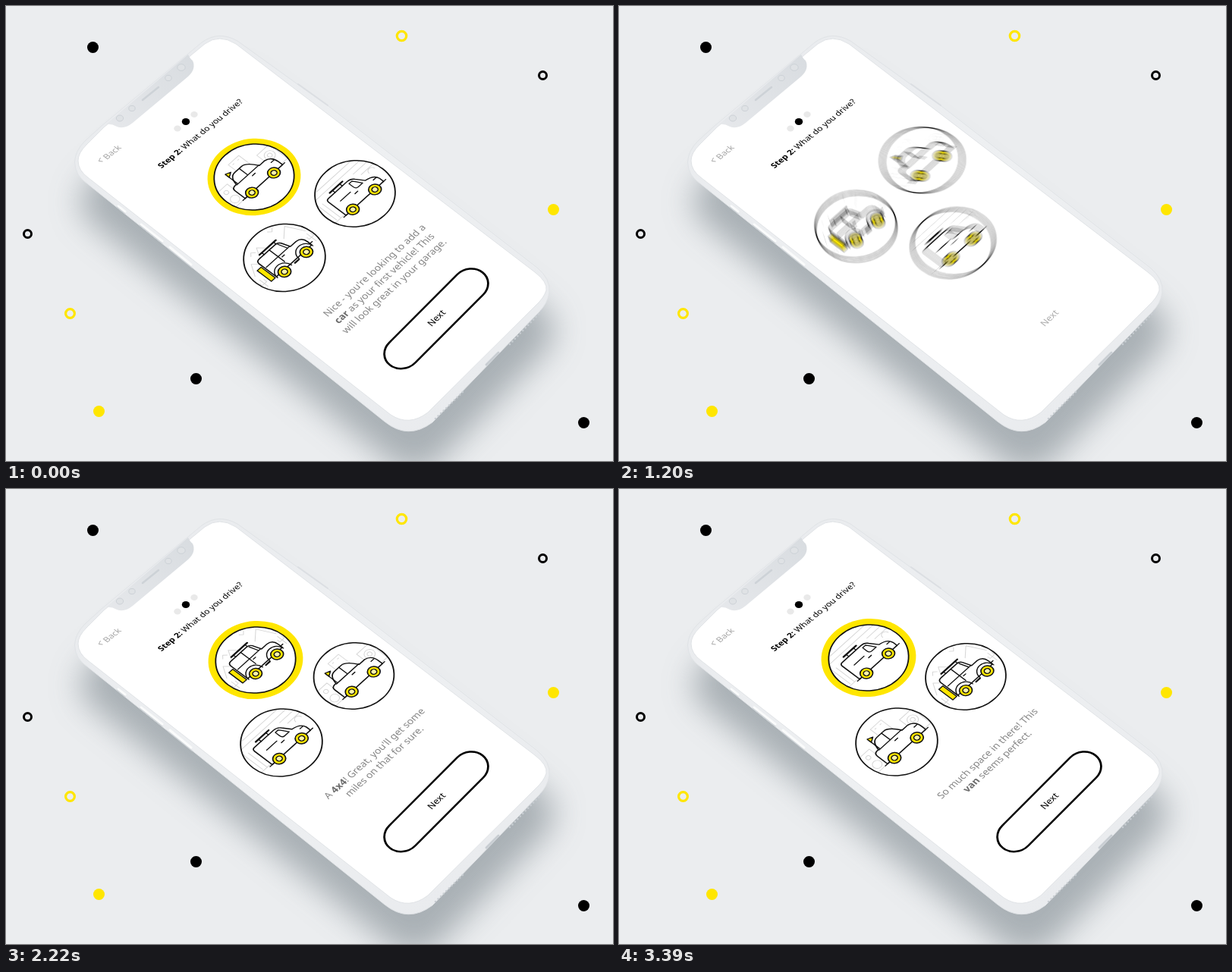
Animation of 800x600 px, one loop 3420 ms. Source, as an HTML page with a canvas:

```html
<!DOCTYPE html>
<html lang="en">
<head>
<meta charset="utf-8">
<title>What do you drive?</title>
<style>
  html, body { margin: 0; width: 100%; height: 100%; overflow: hidden; background: #ebedef; }
  svg, canvas { position: absolute; left: 0; top: 0; width: 800px; height: 600px; }
  text { font-family: "Noto Sans", "Open Sans", sans-serif; }
  .msg text { font-size: 12.9px; fill: #858585; text-anchor: middle; }
  .msg tspan { font-weight: 700; fill: #6c6c6c; }
  .msg { opacity: 0; }
</style>
</head>
<body>
<svg viewBox="0 0 800 600">
  <defs>
    <filter id="soft" x="-25%" y="-25%" width="150%" height="150%"><feGaussianBlur stdDeviation="21"/></filter>
    <linearGradient id="rim" x1="0" y1="0" x2="1" y2="1">
      <stop offset="0" stop-color="#e8eaed"/><stop offset=".5" stop-color="#eef0f2"/><stop offset="1" stop-color="#e8eaed"/>
    </linearGradient>
    <linearGradient id="notch" x1="0" y1="1" x2="1" y2="0">
      <stop offset="0" stop-color="#e6e8eb"/><stop offset="1" stop-color="#d8dce0"/>
    </linearGradient>
    <path id="body" d="M90.500 206Q91 191 104 178L126 158L258 48Q280 32 305 46L384 103L425 132L700 345Q718 360 716 378Q714 392 702 404L562 549Q530 573 499 548L108 235Q91 224 90.500 206Z"/>
  </defs>

  <use href="#body" transform="translate(7 53)" fill="#8d969c" opacity=".7" filter="url(#soft)"/>
  <use href="#body" fill="url(#rim)" stroke="#e0e3e6" stroke-width="1"/>
  <path d="M385 103L424 131" stroke="#dcdfe3" stroke-width="2" stroke-linecap="round"/>
  <g fill="none" stroke="#fafbfb" stroke-width="3" stroke-linecap="round">
    <path d="M148 264L157 271M178 288L206 310M216 318L244 341"/>
    <path stroke="#cfd4d8" stroke-width="1.2" d="M146 265L157 274M176 289L206 313M214 320L245 345"/>
  </g>
  <g fill="none" stroke="#c8cdd2" stroke-linecap="round">
    <path stroke-width="2.600" stroke-dasharray="0 5" d="M566 544L604 507M664 446L706 402"/>
    <path stroke-width="3" d="M633 473L649 457"/>
  </g>
  <path fill="#fff" stroke="#e0e3e6" stroke-width="1" d="M129 160L262 50Q281 36 303 50L697 351Q714 364 712 375Q709 385 698 395L556 536Q531 555 507 539L109 227Q95 217 95 204Q95 194 106 183Z"/>
  <path fill="url(#notch)" d="M132 156L240 64Q243 70 246 72Q251 83 240 93L167 154Q156 163 146 159Q139 155 132 156Z"/>
  <g fill="#dfe2e5" stroke="#cdd2d7">
    <ellipse cx="150" cy="148" rx="4.7" ry="4"/><ellipse cx="166" cy="135" rx="4.2" ry="3.6"/>
    <ellipse cx="214" cy="95" rx="4.2" ry="3.6"/><ellipse cx="231" cy="81" rx="5.2" ry="4.4"/>
    <path d="M180 124L201 107" stroke-width="2.500" stroke-linecap="round"/>
  </g>

  <path fill="none" stroke="#aaa" d="M124.500 200L122.300 204.500L127.500 205"/>
  <text transform="matrix(.78 -.63 .77 .57 133 203)" font-size="11.3" fill="#a6a6a6">Back</text>
  <ellipse cx="226" cy="161.500" rx="4.700" ry="4" fill="#e9e9e9"/>
  <ellipse cx="237" cy="152.500" rx="5.200" ry="4.500" fill="#000"/>
  <ellipse cx="248" cy="143" rx="4.700" ry="4" fill="#e9e9e9"/>
  <text transform="matrix(.775 -.632 .77 .57 259 170.500)" font-size="11.1" text-anchor="middle"><tspan font-weight="700">Step 2:</tspan> What do you drive?</text>

  <g class="msg">
    <text transform="matrix(.74 -.672 .78 .6 489 351.500)">Nice - you're looking to add a</text>
    <text transform="matrix(.74 -.672 .78 .6 502 361.800)"><tspan>car</tspan> as your first vehicle! This</text>
    <text transform="matrix(.74 -.672 .78 .6 515 372.100)">will look great in your garage.</text>
  </g>
  <g class="msg">
    <text transform="matrix(.74 -.672 .78 .6 489 351.500)">A <tspan>4x4</tspan>! Great, you'll get some</text>
    <text transform="matrix(.74 -.672 .78 .6 502 361.800)">miles on that for sure.</text>
  </g>
  <g class="msg">
    <text transform="matrix(.74 -.672 .78 .6 489 351.500)">So much space in there! This</text>
    <text transform="matrix(.74 -.672 .78 .6 502 361.800)"><tspan>van</tspan> seems perfect.</text>
  </g>

  <rect id="button" transform="matrix(.73 -.732 .78 .6 567 412.300)" x="-83.500" y="-22" width="167" height="44" rx="22" fill="none" stroke="#000" stroke-width="2.6"/>
  <text id="next" transform="matrix(.73 -.7 .78 .6 570.500 414)" font-size="12" text-anchor="middle">Next</text>

  <g fill="#000"><circle cx="114.500" cy="54.500" r="7.500"/><circle cx="250.500" cy="491.500" r="7.500"/><circle cx="761.500" cy="549.500" r="7.500"/></g>
  <g fill="#ffe600"><circle cx="721.500" cy="268.500" r="7.500"/><circle cx="122.500" cy="534.500" r="7.500"/></g>
  <g fill="none" stroke="#ffe600" stroke-width="3.200"><circle cx="521.500" cy="39.500" r="6.200"/><circle cx="84.500" cy="405.500" r="5.900"/></g>
  <g fill="none" stroke="#000" stroke-width="3"><circle cx="707.500" cy="91.500" r="5"/><circle cx="28.500" cy="300.500" r="5"/></g>
</svg>
<canvas id="stage" width="800" height="600"></canvas>

<script>
const LOOP = 3420, SPIN = 400, SHUTTER = 18, SAMPLES = 10;
const STARTS = [1004, 2282];
const YELLOW = '#ffe600', INK = '#111', RADIUS = 50.1;

// Each vehicle is drawn flat in a circle of radius 50; slots are top, right, left.
const vehicles = [
  { // car
    slots: [[327, 225.5], [458.5, 246.5], [366, 333.5]],
    scene: 'M-52-18H-30V14H-52ZM-34 5a6 6 0 1 0-12 0a6 6 0 1 0 12 0M-37-10a3 3 0 1 0-6 0a3 3 0 1 0 6 0M-8-37H11V-10H-8ZM-4-33h2M5-33h2M26-20H48V12H26ZM44-8a7 7 0 1 0-14 0a7 7 0 1 0 14 0M40-8a3 3 0 1 0-6 0a3 3 0 1 0 6 0',
    body: 'M-31 14V-3Q-31-9-25-9H-23Q-20-23-11-23H1Q9-23 17-7H27Q37-5 37 7V14Z',
    detail: 'M-23-8H17M-3-23V-8M0-3h5M30 1h5M-21-29V-9M-35 14h7M35 14h6',
    accent: 'M-21-30L-14-27L-21-23Z',
    wheels: [-19, 21]
  },
  { // van
    slots: [[329, 222.5], [460, 247.5], [363, 334.5]],
    scene: 'M-30-38H40M-48-30H-30M-44 10V-30M-34-30H46M20-22H50M26-14H50M-50 12H-30M-38-20V12M34-8a5 5 0 1 1 10 0',
    body: 'M-31 14V-16Q-31-20-27-20H7Q13-20 16-15L23-4Q36-2 37 7V14Z',
    detail: 'M-20-6H-2M6-16H11Q14-12 18-4H10Q6-4 6-9ZM0 0h5M30 3h5M-35 14h6M35 14h6M-15-24v4M-2-24v4',
    heavy: 'M-20-24.500H3',
    wheels: [-19, 21]
  },
  { // 4x4
    slots: [[329, 225.5], [457, 247.5], [367, 332]],
    scene: 'M-44-8L-34-24L-25-14L-12-36L0-22M20-20L34-32L46-8M-26-32L-22-36L-18-32M14-42L18-38L22-42M44-4V12M40 0V4H48V-1M-44 0V14M-48 4V8H-40V3',
    body: 'M-27 12V-17Q-27-22-22-22H7Q11-22 13-18L17-6H27Q36-5 36 5V12Z',
    detail: 'M-25-7H17M-4-22V4M9-20L13-7M-1-3h4M-27 14A12.500 12.500 0 0 1-2 14M11 14A12.500 12.500 0 0 1 36 14M-13-26v4M8-26v4M36 9h4',
    heavy: 'M-17-26H12M3 15H10',
    accent: 'M-36-12H-29V12H-36Z',
    wheels: [-15, 24]
  }
];

// Affine circle through the three slots: centre + a cos + b sin.
for (const v of vehicles) {
  const [p, q, r] = v.slots, k = 2 / Math.sqrt(3);
  v.mid = [0, 1].map(i => (p[i] + q[i] + r[i]) / 3);
  v.a = [0, 1].map(i => p[i] - v.mid[i]);
  v.b = [0, 1].map(i => (q[i] - v.mid[i] + v.a[i] / 2) * k);
  for (const key of ['scene', 'body', 'detail', 'heavy', 'accent']) v[key] = new Path2D(v[key] || '');
}

const ctx = document.getElementById('stage').getContext('2d');
const layer = document.createElement('canvas');
layer.width = 800;
layer.height = 600;
const g = layer.getContext('2d');
const messages = document.querySelectorAll('.msg');
const button = document.getElementById('button');
const next = document.getElementById('next');

const ramp = (t, from, to) => Math.min(1, Math.max(0, (t - from) / (to - from)));
const ease = x => (1 - Math.cos(Math.PI * x)) / 2;
const turnAt = t => STARTS.reduce((sum, s) => sum + ease(ramp(t, s, s + SPIN)), 0);
// 1 while resting, dropping to 0 around each spin
const restAt = (t, out0, out1, in0, in1) => STARTS.reduce((v, s) =>
  v - ramp(t, s + out0, s + out1) + ramp(t, s + in0, s + in1), 1);

function disc(x, y, r, fill, stroke, width) {
  g.beginPath();
  g.arc(x, y, r, 0, Math.PI * 2);
  if (fill) { g.fillStyle = fill; g.fill(); }
  if (stroke) { g.strokeStyle = stroke; g.lineWidth = width; g.stroke(); }
}

function line(path, color, width) {
  g.strokeStyle = color;
  g.lineWidth = width;
  g.stroke(path);
}

function drawVehicle(v, angle, ring) {
  const c = Math.cos(angle), s = Math.sin(angle);
  const [x, y] = [0, 1].map(i => v.mid[i] + v.a[i] * c + v.b[i] * s);
  const k = 1 + (y - 269) * 0.0002;
  g.setTransform(.73 * k, -.66 * k, .77 * k, .578 * k, x, y);
  g.lineJoin = g.lineCap = 'round';
  if (ring) disc(0, 0, ring, YELLOW);
  disc(0, 0, RADIUS, '#fff');
  g.save();
  g.clip();
  line(v.scene, '#d6d6d6', 1);
  g.restore();
  g.fillStyle = '#fff';
  g.fill(v.body);
  line(v.body, INK, 1.6);
  line(v.detail, INK, 1.4);
  line(v.heavy, INK, 2.4);
  g.fillStyle = YELLOW;
  g.fill(v.accent);
  line(v.accent, INK, 1.4);
  for (const wx of v.wheels) {
    disc(wx, 14.3, 8, YELLOW, INK, 1.6);
    disc(wx, 14.3, 3.8, '#fff6a8', INK, 1.5);
  }
  disc(0, 0, RADIUS, null, INK, 1.7);
}

function drawAll(turn, active, ring) {
  g.setTransform(1, 0, 0, 1, 0, 0);
  g.clearRect(0, 0, 800, 600);
  vehicles.forEach((v, i) =>
    drawVehicle(v, (i + turn) * Math.PI * 2 / 3, i === active ? ring : 0));
}

function render(t) {
  const step = STARTS.filter(s => t > s + 200).length;
  const active = (3 - step) % 3;
  const grown = restAt(t, -60, 70, 280, 385);
  const pulse = 58.9 - 0.5 * Math.cos(t / 620 * Math.PI * 2);
  const ring = grown > 0.001 ? RADIUS + (pulse - RADIUS) * ease(grown) : 0;

  const moving = STARTS.some(s => t > s - SHUTTER && t < s + SPIN + SHUTTER);
  const count = moving ? SAMPLES : 1;
  ctx.globalCompositeOperation = 'source-over';
  ctx.clearRect(0, 0, 800, 600);
  ctx.globalCompositeOperation = 'lighter';
  ctx.globalAlpha = 1 / count;
  for (let i = 0; i < count; i++) {
    drawAll(turnAt(t + ((i + .5) / count - .5) * SHUTTER), active, ring);
    ctx.drawImage(layer, 0, 0);
  }

  const shown = restAt(t, -60, 60, 430, 600);
  messages.forEach((m, i) => m.style.opacity = i === step ? shown : 0);
  button.style.opacity = shown;
  const grey = Math.round(172 * (1 - shown));
  next.style.fill = `rgb(${grey},${grey},${grey})`;
}

const begin = performance.now();
function tick() {
  render((performance.now() - begin) % LOOP);
  requestAnimationFrame(tick);
}
tick();
</script>
</body>
</html>
```
